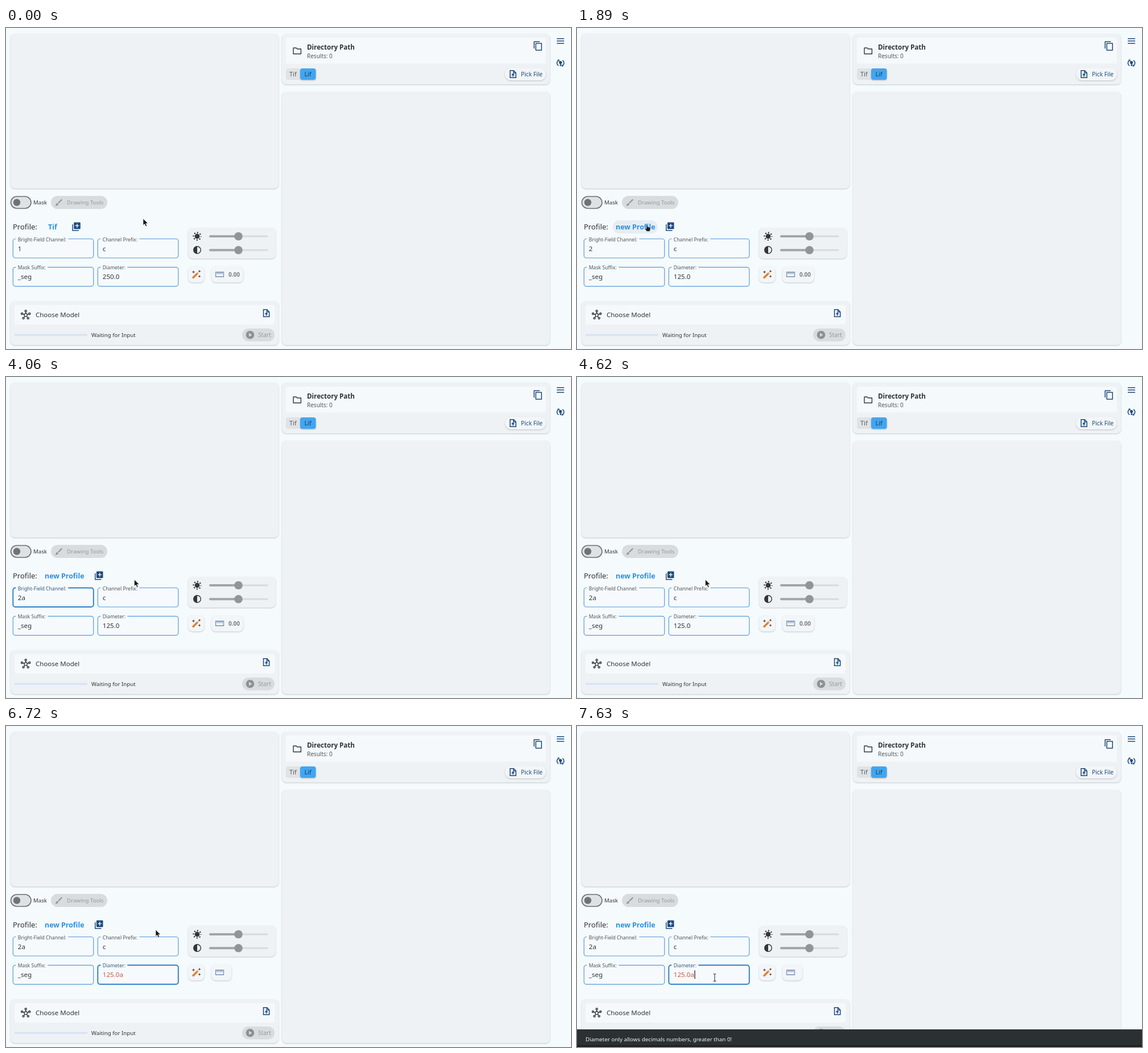
Recreate the animation shown at these times as an HTML page. Size 993x564 px, loop 8 s.

```html
<!DOCTYPE html>
<html lang="en">
<head>
<meta charset="utf-8">
<title>Profile settings</title>
<style>
  html, body { margin: 0; width: 100%; height: 100%; overflow: hidden; background: #f5fafc; }
  svg { display: block; width: 100%; height: 100%; }
  text { font-family: "Noto Sans", "Open Sans", sans-serif; fill: #2e3438; white-space: pre; }
  .panel { fill: #eef2f5; filter: drop-shadow(0 1px 1px #0003); }
  .card { fill: #f5f9fb; }
  .button { fill: #f2f6f8; filter: drop-shadow(0 1px 1px #0003); }
  .off { fill: #d9dcde; }
  .offText { fill: #96999c; }
  .navy { fill: none; stroke: #1d4a7c; stroke-width: 1.5; }
  .dark { fill: none; stroke: #30363a; stroke-width: 1.4; }
  .blue { fill: #2c8fe0; font-weight: 600; font-size: 12.4px; }
  .frame { fill: #f6fafc; stroke: #5799d8; stroke-width: 1.15; }
  .focus .frame { stroke: #2f7fca; stroke-width: 1.9; }
  .label { font-size: 8.65px; fill: #4b5358; }
  .focus .label { fill: #2f587f; }
  .value { font-size: 11.6px; }
  .bad .value { fill: #c75b42; }
  .caret { fill: #262c30; }
  .s97 { font-size: 9.7px; }
</style>
</head>
<body>
<svg viewBox="0 0 993 564">
  <defs>
    <g id="upload" class="navy">
      <path d="M1 .8H7.2L11.2 4.8V13.2H1ZM7 1V5H11M6.1 11.5V6.7M3.9 8.7L6.1 6.5L8.3 8.7"/>
    </g>
    <g id="slider">
      <path d="M359 0H409" stroke="#a1a5a7" stroke-width="4" stroke-linecap="round"/>
      <path d="M409 0H459" stroke="#d8dbdd" stroke-width="3" stroke-linecap="round"/>
      <circle cx="408.5" r="7.3" fill="#929597"/>
    </g>
  </defs>

  <rect class="panel" x="8" y="10" width="471" height="272" rx="8"/>
  <rect class="panel" x="485" y="10" width="471" height="89" rx="8"/>
  <rect class="panel" x="485" y="112" width="471" height="445" rx="8"/>
  <rect class="panel" x="8" y="480" width="471" height="77" rx="8"/>

  <!-- directory -->
  <rect class="card" x="492" y="17" width="457" height="45.5" rx="4"/>
  <path class="dark" d="M505 35H510L511.6 36.7H518.4V45.5H505Z" stroke-linejoin="round"/>
  <text x="529" y="37.5" font-size="11.6" font-weight="600">Directory Path</text>
  <text x="529" y="52.5" font-size="10" style="fill:#50575b">Results: 0</text>
  <path class="navy" d="M928.2 36V24H938M931.2 27H941.2V39H931.2Z" stroke-linejoin="round"/>
  <path d="M517 71H496a4 4 0 0 0-4 4V87a4 4 0 0 0 4 4H517Z" fill="#e0e3e5"/>
  <rect x="517" y="71" width="27.5" height="20" rx="4" fill="#42a5f1" style="filter:drop-shadow(0 1px 1px #0004)"/>
  <text x="498" y="84.7" font-size="11" style="fill:#555b5f">Tif</text>
  <text x="524.5" y="84.7" font-size="11" style="fill:#17405f">Lif</text>
  <rect class="button" x="877" y="70" width="72" height="22" rx="11"/>
  <use href="#upload" x="885" y="74"/>
  <text x="905" y="84.5" font-size="10.2" style="fill:#1d4a7c">Pick File</text>

  <!-- side bar -->
  <path class="navy" d="M968 18.7H981M968 22.8H981M968 27H981"/>
  <g class="navy">
    <path d="M971 66.3A5.6 5.6 0 0 1 971 56.8M978 66.3A5.6 5.6 0 0 0 978 56.8"/>
    <path d="M969.5 56.2H972V59M979.5 66.8H977V64" stroke-width="1.2"/>
    <path d="M974.5 67V60" stroke-width="2"/>
    <circle cx="974.5" cy="60.5" r="1.8" fill="#1d4a7c"/>
  </g>

  <!-- mask and drawing tools -->
  <rect x="8.5" y="296" width="35.5" height="21" rx="10.5" fill="#dfe2e4" stroke="#6d7174" stroke-width="1.6"/>
  <circle cx="19" cy="306.5" r="6.2" fill="#707376"/>
  <text x="48" y="310.2" class="s97">Mask</text>
  <rect class="off" x="79" y="295" width="99" height="23" rx="11.5"/>
  <path d="M91 307L97.5 300.5L99 302L92.5 308.5ZM90.3 307.8L92 309.5Q91 313 86 312.2Q88 311 88 309.5Q88.6 307.6 90.3 307.8Z" fill="#929597"/>
  <text x="107" y="310.2" class="offText s97">Drawing Tools</text>

  <!-- profile -->
  <text x="12" y="354" font-size="13">Profile:</text>
  <rect id="hover" x="63" y="338" width="79" height="23" rx="11.5" fill="#e6edf4"/>
  <text id="profile" class="blue" y="354"></text>
  <g id="add">
    <path class="navy" d="M.8 3.5V14.2H11.5"/>
    <rect x="3" y="0" width="11.5" height="11.8" rx="1" fill="#1d4a7c"/>
    <path d="M8.7 2.5V9.3M5.3 5.9H12.1" stroke="#f5fafc" stroke-width="1.4"/>
  </g>
  <g id="fields"></g>

  <!-- brightness and contrast -->
  <rect class="panel" x="320" y="351" width="154" height="54" rx="8"/>
  <g transform="translate(336 366)" fill="#30363a">
    <circle r="4.4"/>
    <circle r="6.5" fill="none" stroke="#30363a" stroke-width="2.4" stroke-dasharray="2 3.105" stroke-dashoffset="1"/>
  </g>
  <circle class="dark" cx="336" cy="390" r="6.3"/>
  <path d="M336 383.7a6.3 6.3 0 0 0 0 12.6Z" fill="#30363a"/>
  <use href="#slider" y="366"/>
  <use href="#slider" y="390.3"/>

  <!-- wand and ruler -->
  <rect class="button" x="320" y="419" width="28.5" height="28" rx="8"/>
  <path d="M328 439.5L337.5 430" stroke="#e08035" stroke-width="3.6"/>
  <path d="M335.3 429.8L337.8 432.3" stroke="#f5f0ea" stroke-width="1"/>
  <path d="M329.5 426l.9 1.8 1.8.9-1.8.9-.9 1.8-.9-1.8-1.8-.9 1.8-.9ZM340 425l.8 1.6 1.6.8-1.6.8-.8 1.6-.8-1.6-1.6-.8 1.6-.8ZM340 434l.8 1.6 1.6.8-1.6.8-.8 1.6-.8-1.6-1.6-.8 1.6-.8Z" fill="#70493a"/>
  <rect id="ruler" class="button" x="361" y="419" height="28" rx="8"/>
  <path d="M368.5 429H382.5V437H368.5ZM371.3 429V432.5M374.1 429V432.5M376.9 429V432.5M379.7 429V432.5" fill="none" stroke="#7890b0" stroke-width="1.3"/>
  <text id="length" x="391" y="436.7" font-size="10" font-weight="600" style="fill:#7b8084">0.00</text>

  <!-- model -->
  <rect class="card" x="15" y="487" width="457" height="34" rx="4"/>
  <g id="hub" class="dark" transform="translate(34.7 504.2)" stroke-width="1.2"><circle r="2.7"/></g>
  <text x="52" y="508" font-size="11.5">Choose Model</text>
  <use href="#upload" x="451.5" y="494"/>
  <rect x="15" y="537.7" width="128" height="3" fill="#d5e3f5"/>
  <text x="150" y="542.7" class="s97">Waiting for Input</text>
  <rect class="off" x="415" y="528" width="57" height="22.5" rx="11.2"/>
  <circle cx="429" cy="539.2" r="7.3" fill="#8e9194"/>
  <path d="M427 535.8V542.6L432.3 539.2Z" fill="#d9dcde"/>
  <text x="443" y="542.9" font-size="10.2" class="offText">Start</text>

  <g id="snack">
    <rect y="533" width="993" height="31" fill="#2b3133"/>
    <rect y="561" width="993" height="3" fill="#231d20"/>
    <text x="15" y="554" font-size="9.8" style="fill:#eef2f3">Diameter only allows decimals numbers, greater than 0!</text>
  </g>

  <g id="cursor">
    <path id="arrow" d="M0 0V11.6L2.7 9.2L4.7 13.6L6.7 12.7L4.8 8.4L8.4 8.2Z" fill="#16181a" stroke="#fff" stroke-width=".6"/>
    <path id="hand" d="M-1 -4Q.3 -5 1 -3.6V-.8L5 .2Q6.4 .8 6 3L5 7.3H-.4L-4 2.6Q-3.4 1.2-1.2 2.6Z" fill="#1b1e20" stroke="#fff" stroke-width=".5"/>
    <path id="beam" d="M-2.5 -6.5Q0 -6.5 0 -5V5Q0 6.5-2.5 6.5M2.5 -6.5Q0 -6.5 0 -5V5Q0 6.5 2.5 6.5" fill="none" stroke="#33383c" stroke-width="1.1"/>
  </g>
</svg>
<script>
const LOOP = 8000, STEP = 70, BLINK = 500;
const $ = id => document.getElementById(id);
const show = (node, on) => node.setAttribute('visibility', on ? 'visible' : 'hidden');

function makeField(x, y, label, gap) {
  const g = document.createElementNS('http://www.w3.org/2000/svg', 'g');
  g.innerHTML = `<rect class="frame" x="${x}" y="${y}" width="141.5" height="33.5" rx="4"/>
    <rect x="${x + 5}" y="${y - 2}" width="${gap}" height="4" fill="#f6fafc"/>
    <text class="label" x="${x + 8.5}" y="${y + 4}">${label}</text>
    <text class="value" x="${x + 8.5}" y="${y + 21}"></text>
    <rect class="caret" y="${y + 9}" width="1.3" height="15"/>`;
  $('fields').append(g);
  const value = g.querySelector('.value'), caret = g.querySelector('.caret');
  return (text, focused, caretOn, bad) => {
    value.textContent = text;
    g.classList.toggle('focus', focused);
    g.classList.toggle('bad', !!bad);
    caret.setAttribute('x', x + 9 + value.getComputedTextLength());
    show(caret, focused && caretOn);
  };
}
const channel = makeField(12.3, 370.5, 'Bright-Field Channel:', 92);
const prefix = makeField(161.3, 370.5, 'Channel Prefix:', 68);
const suffix = makeField(12.3, 420.3, 'Mask Suffix:', 56);
const diameter = makeField(161.3, 420.3, 'Diameter:', 47);
prefix('c', false);
suffix('_seg', false);

for (let i = 0; i < 5; i++) {
  const a = (i * 72 - 90) * Math.PI / 180, c = Math.cos(a), s = Math.sin(a);
  $('hub').innerHTML += `<path d="M${c * 2.7} ${s * 2.7}L${c * 5.5} ${s * 5.5}"/><circle cx="${c * 7}" cy="${s * 7}" r="1.5"/>`;
}

// Pointer stops: time, x, y
const stops = [
  [0, 241, 335], [70, 241, 335], [700, 123, 350], [1890, 123, 350], [2520, 72, 388],
  [3570, 72, 388], [4060, 225.5, 356], [4900, 225.5, 356], [5320, 233.5, 442],
  [6200, 233.5, 442], [6580, 263, 358], [7070, 263, 358], [7490, 242, 442], [LOOP, 242, 442]
];
function pointerAt(t) {
  const i = stops.findIndex(s => s[0] > t);
  const [t0, x0, y0] = stops[i - 1], [t1, x1, y1] = stops[i];
  const p = (t - t0) / (t1 - t0), k = p * p * (3 - 2 * p);
  return [x0 + (x1 - x0) * k, y0 + (y1 - y0) * k];
}
const blinkOn = (t, since) => Math.floor((t - since) / BLINK) % 2 === 0;

function draw(t) {
  const created = t >= 1120;
  const [x, y] = pointerAt(t);
  const inRow = y > 338 && y < 361;
  const overProfile = inRow && (created ? x > 63 && x < 142 : x > 69 && x < 95);
  const overAdd = !created && inRow && x > 113 && x < 135;
  const inField = (y > 370 && y < 404 || y > 420 && y < 454) && (x > 12 && x < 154 || x > 161 && x < 303);

  $('profile').textContent = created ? 'new Profile' : 'Tif';
  $('profile').setAttribute('x', created ? 68 : 74);
  $('add').setAttribute('transform', `translate(${created ? 156 : 116.3} 341.5)`);
  show($('hover'), created && overProfile);

  const typedChannel = t >= 3080, typedDiameter = t >= 6200;
  channel(!created ? '1' : typedChannel ? '2a' : '2', t >= 2600 && t < 4620,
    blinkOn(t, typedChannel ? 3080 : 2600));
  const refocused = t >= 7530;
  diameter(!created ? '250.0' : typedDiameter ? '125.0a' : '125.0',
    t >= 5740 && t < 6790 || refocused,
    blinkOn(t, refocused ? 7530 : typedDiameter ? 6200 : 5740), typedDiameter);

  const measured = t < 4970;
  show($('length'), measured);
  $('ruler').setAttribute('width', measured ? 56 : 35.5);

  const rise = Math.min(1, Math.max(0, (t - 6730) / 250));
  $('snack').setAttribute('transform', `translate(0 ${32 * (1 - rise) ** 3})`);
  show($('snack'), rise > 0);

  $('cursor').setAttribute('transform', `translate(${x} ${y})`);
  const hand = overProfile || overAdd;
  show($('hand'), hand);
  show($('beam'), inField);
  show($('arrow'), !hand && !inField);
}

const start = performance.now();
function tick() {
  const t = (performance.now() - start) % LOOP;
  draw(Math.floor(t / STEP) * STEP);
  requestAnimationFrame(tick);
}
tick();
</script>
</body>
</html>
```
